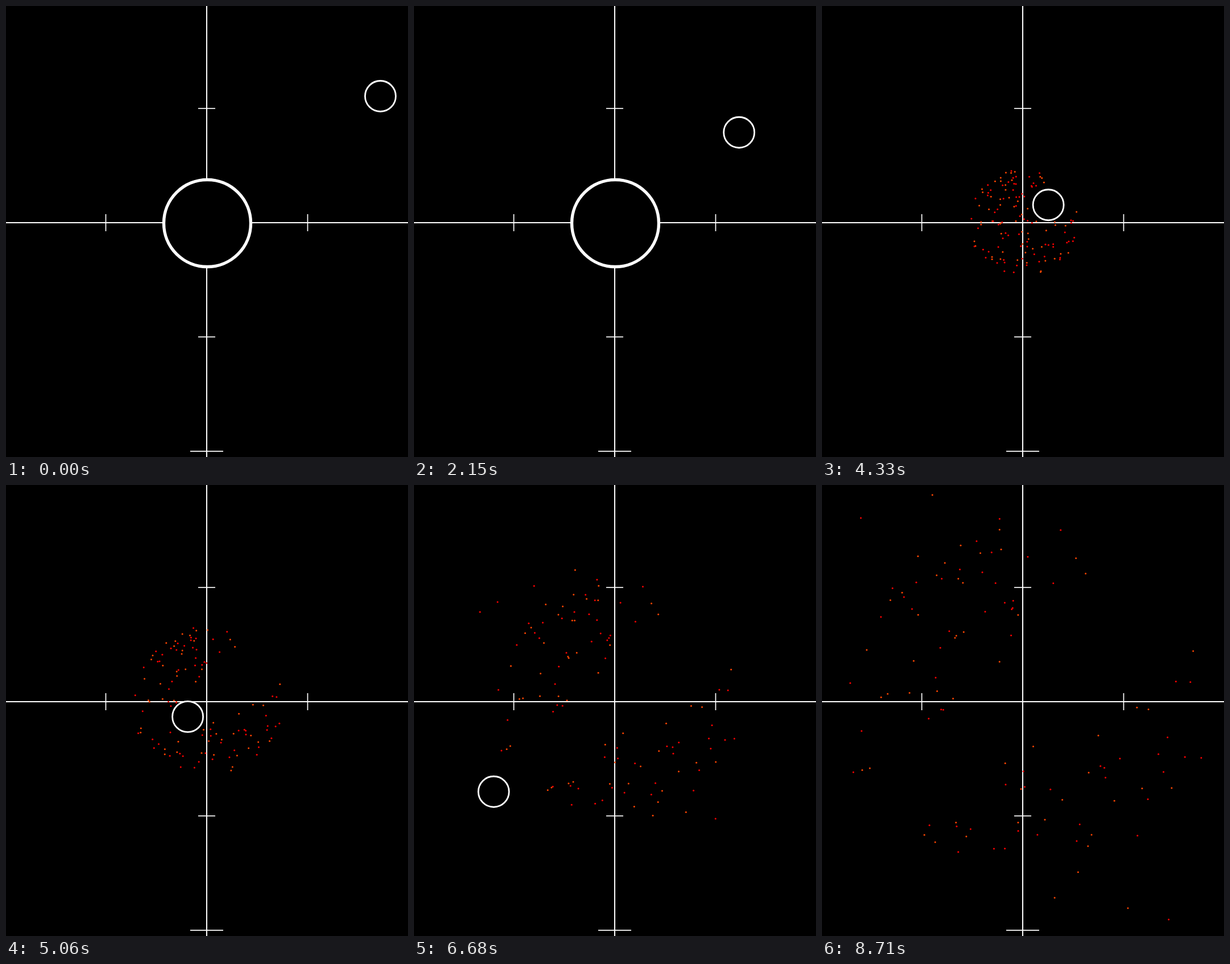
An HTML page with a canvas that plays this animation: 707 px wide and 793 px high, repeating every 8.81 s.

```html
<!DOCTYPE html>
<html lang="en">
<head>
<meta charset="utf-8">
<title>Collision</title>
<style>
html, body { margin: 0; width: 100%; height: 100%; overflow: hidden; background: #000; }
canvas { display: block; }
</style>
</head>
<body>
<canvas id="stage" width="707" height="793"></canvas>
<script>
const ctx = document.getElementById('stage').getContext('2d');
const LOOP = 8810, HIT = 3980;
const AXIS = { x: 353, y: 381 }, BODY = { x: 354, y: 382, r: 76.5 };
const RING_R = 27, SLOPE = -0.7345;
const COUNT = 140, SPREAD = 1600;

// The ring falls in ever faster, then almost coasts after the impact.
function ringAt(t) {
  const u = t - HIT;
  const x = t < HIT
    ? 658.5 - t * (0.0288 + 5.3e-6 * t + 0.0031 * (t / 3550) ** 6)
    : 435.3 - u * (0.1055 + 1.4e-6 * u);
  return { x, y: 158.5 + (x - 658.5) * SLOPE };
}

function random(seed) {
  return () => (seed = (seed * 16807) % 2147483647) / 2147483647;
}

const rnd = random(90210);
const impact = ringAt(HIT);
const push = { x: -0.109, y: -0.109 * SLOPE };

// A dot drifts outward until the ring meets it: a square hit absorbs it,
// a glancing one leaves only its motion along the ring's edge.
function makeDot() {
  const angle = rnd() * Math.PI * 2, r = 79 * Math.sqrt(rnd());
  const dx = r * Math.cos(angle), dy = r * Math.sin(angle);
  const dot = {
    x: BODY.x + dx, y: BODY.y + dy,
    vx: dx / SPREAD + (rnd() - 0.5) * 0.016,
    vy: dy / SPREAD + (rnd() - 0.5) * 0.016,
    color: rnd() < 0.42 ? '#ff4500' : '#ff0000',
    hit: Infinity
  };
  const qx = dot.x - impact.x, qy = dot.y - impact.y;
  const wx = dot.vx - push.x, wy = dot.vy - push.y;
  const reach = RING_R + 2;
  const a = wx * wx + wy * wy, b = qx * wx + qy * wy;
  const root = b * b - a * (qx * qx + qy * qy - reach * reach);
  if (b >= 0 || root < 0) return dot;

  dot.hit = Math.max(0, (-b - Math.sqrt(root)) / a);
  const nx = (qx + wx * dot.hit) / reach, ny = (qy + wy * dot.hit) / reach;
  const normal = wx * nx + wy * ny;
  dot.absorbed = -normal / Math.sqrt(a) > 0.75;
  dot.kx = -normal * nx;
  dot.ky = -normal * ny;
  return dot;
}

const dots = Array.from({ length: COUNT }, makeDot);

function line(x0, y0, x1, y1) {
  ctx.beginPath();
  ctx.moveTo(x0, y0);
  ctx.lineTo(x1, y1);
  ctx.stroke();
}

function ring(x, y, r, width) {
  ctx.lineWidth = width;
  ctx.beginPath();
  ctx.arc(x, y, r, 0, Math.PI * 2);
  ctx.fillStyle = '#000';
  ctx.fill();
  ctx.stroke();
}

function drawAxes() {
  ctx.lineWidth = 2;
  line(AXIS.x, 0, AXIS.x, 793);
  line(0, AXIS.y, 707, AXIS.y);
  ctx.lineWidth = 1.7;
  for (const side of [-1, 1]) {
    const x = AXIS.x + side * 177.5, y = AXIS.y + side * 200.8;
    line(x, 366, x, 396);
    line(338, y, 368, y);
  }
  line(324, 782.8, 382, 782.8);
}

function drawDots(u) {
  for (const p of dots) {
    const after = Math.max(0, u - p.hit);
    if (after > 0 && p.absorbed) continue;
    const x = p.x + p.vx * u + (after && p.kx * after);
    const y = p.y + p.vy * u + (after && p.ky * after);
    ctx.fillStyle = p.color;
    ctx.beginPath();
    ctx.arc(x, y, 1.5, 0, Math.PI * 2);
    ctx.fill();
  }
}

function draw(t) {
  ctx.fillStyle = '#000';
  ctx.fillRect(0, 0, 707, 793);
  ctx.strokeStyle = '#fff';
  drawAxes();
  if (t < HIT) ring(BODY.x, BODY.y, BODY.r, 5.4);
  else drawDots(t - HIT);
  const { x, y } = ringAt(t);
  ring(x, y, RING_R, 2.8);
}

const start = performance.now();
function tick() {
  draw((performance.now() - start) % LOOP);
  requestAnimationFrame(tick);
}
tick();
</script>
</body>
</html>
```
